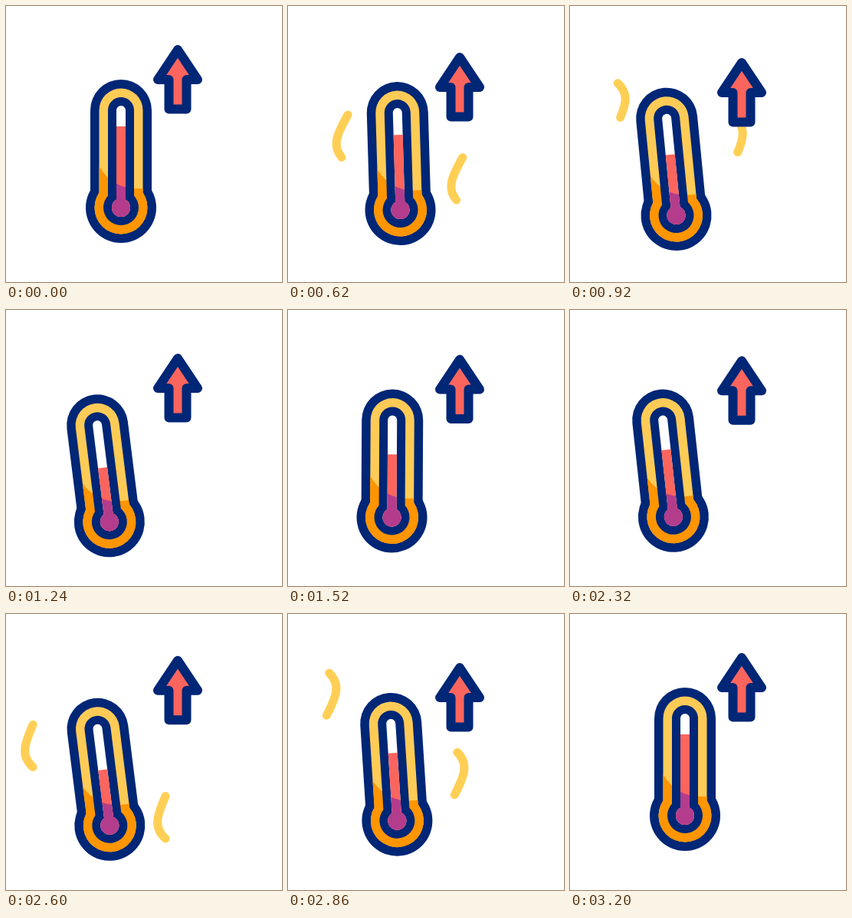
Write an HTML page that moves like this. It is 360 px wide and 360 px high and loops after 3.22 s.

```html
<!DOCTYPE html>
<html lang="en">
<head>
<meta charset="utf-8">
<title>Rising temperature</title>
<style>
  html, body { margin: 0; width: 100%; height: 100%; overflow: hidden; background: #fff; }
  svg { display: block; width: 100vw; height: 100vh; }
  .tube { stroke-linecap: round; }
  .wave { fill: none; stroke: #ffcf55; stroke-width: 11; stroke-linecap: round; }
  .arrow { fill: #fc655e; stroke: #002676; stroke-width: 12; stroke-linejoin: round; }
</style>
</head>
<body>
<svg viewBox="0 0 360 360">
  <defs>
    <clipPath id="shade">
      <path d="M-50 -80 L-28.5 -54 Q-10 -22 28 -25 H50 V50 H-50Z"/>
    </clipPath>
    <clipPath id="liquid"><rect id="level" x="-20" width="40" height="140"/></clipPath>
  </defs>
  <!-- local origin is the centre of the bulb -->
  <g id="thermometer">
    <g id="waves"></g>
    <g id="layers"></g>
  </g>
  <path id="arrow" class="arrow" d="M224 57 L250 96 H235.5 V134.5 H212.5 V96 H198Z"/>
</svg>
<script>
const LOOP = 3220;
const $ = id => document.getElementById(id);

const shape = (color, half, radius) =>
  `<path class="tube" d="M0 -127V0" stroke="${color}" stroke-width="${half * 2}"/>` +
  `<circle r="${radius}" fill="${color}"/>`;
const clipped = (id, content) => `<g clip-path="url(#${id})">${content}</g>`;

$('layers').innerHTML =
  shape('#002676', 40, 46) +
  shape('#ffcb57', 28.5, 34.5) +
  clipped('shade', shape('#ff9500', 28.5, 34.5)) +
  shape('#002676', 17, 23) +
  shape('#fff', 6, 12) +
  clipped('liquid', shape('#fc655e', 6, 12)) +
  clipped('shade', shape('#b43c8c', 6, 12));

// Each pair of heat waves: start time and the two wave centres
const bursts = [
  { start: 350, centres: [[-66, -124], [82, -64]] },
  { start: 2340, centres: [[-83, -143], [77, -29]] }
];
$('waves').innerHTML = bursts.map(b => '<g>' + b.centres.map(([x, y]) =>
  `<path class="wave" pathLength="1" transform="translate(${x} ${y})"
    d="M-7 55 C-21 39 -15 25 0 0 C15 -25 21 -39 7 -55"/>`).join('') + '</g>').join('');
const groups = [...$('waves').children];

const progress = (t, from, to) => Math.min(1, Math.max(0, (t - from) / (to - from)));
const hump = (t, from, to) => Math.sin(Math.PI * progress(t, from, to));
const swell = (t, from, to) => hump(t, from, to) ** 2;
const ease = (t, from, to) => (1 - Math.cos(Math.PI * progress(t, from, to))) / 2;

function draw(t) {
  // The body slides away and back; in between it swings right, lifts and refills
  const away = ease(t, 350, 1200) - ease(t, 2520, 3200);
  const swing = swell(t, 1180, 2440);
  const x = 150 - 15.2 * away + 1.3 * swing;
  const y = 263 + 13.3 * away - 16.3 * swell(t, 1240, 2620);
  const angle = -7.4 * away + 13.7 * swing;
  const level = 106 - 35 * away + 34 * swell(t, 1240, 2680);
  const drop = 17 * (hump(t, 440, 1345) + hump(t, 1345, 2540)) + 13 * hump(t, 2540, 3200);

  $('thermometer').setAttribute('transform', `translate(${x} ${y}) rotate(${angle})`);
  $('level').setAttribute('y', -level);
  $('arrow').setAttribute('transform', `translate(0 ${drop})`);

  groups.forEach((group, i) => {
    const age = t - bursts[i].start;
    const head = progress(age, 0, 520), tail = progress(age, 260, 780);
    group.setAttribute('visibility', head > tail ? 'visible' : 'hidden');
    group.setAttribute('stroke-dasharray', `${head - tail} 2`);
    group.setAttribute('stroke-dashoffset', -tail);
  });
}

let begin;
function tick(now) {
  begin ??= now;
  draw((now - begin) % LOOP);
  requestAnimationFrame(tick);
}
draw(0);
requestAnimationFrame(tick);
</script>
</body>
</html>
```
